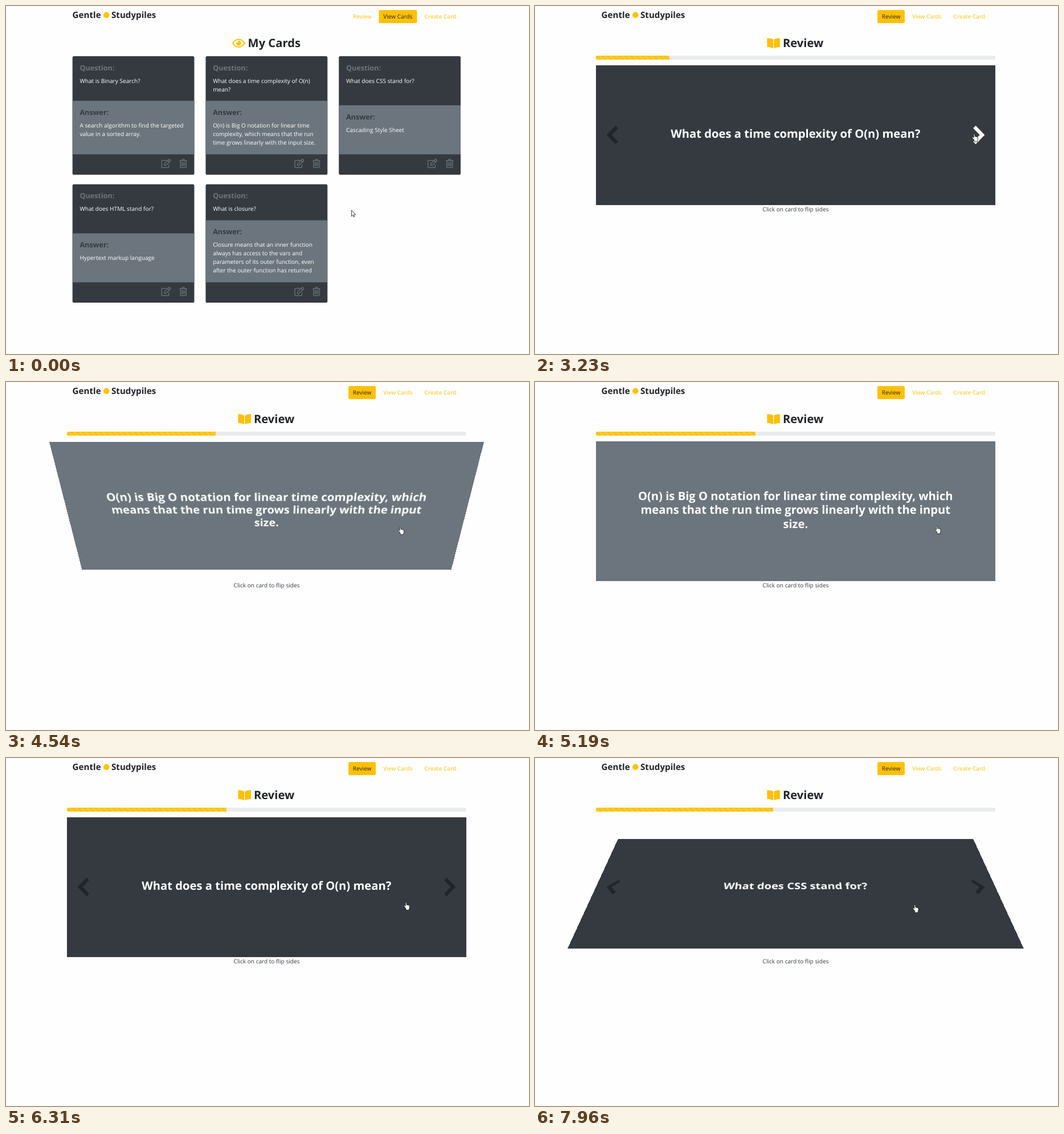
An HTML page for the animation above (8 s loop, 918 by 610 pixels).

```html
<!DOCTYPE html>
<html lang="en">
<head>
<meta charset="utf-8">
<title>Flash cards</title>
<style>
  html, body { margin: 0; width: 100%; height: 100%; overflow: hidden; background: #fefefe; }
  #stage { position: relative; width: 918px; height: 610px; overflow: hidden; }
  #stage > svg { position: absolute; left: 0; top: 0; }
  text { font-family: "Open Sans", sans-serif; font-size: 10.1px; white-space: pre; text-rendering: geometricPrecision; }
  .h1 { font-size: 20.2px; font-weight: 700; fill: #212529; }
  .h4 { font-size: 15.15px; font-weight: 700; fill: #212529; }
  .h5 { font-size: 12.63px; font-weight: 700; }
  .face { position: absolute; left: 107px; top: 104px; width: 701px; height: 245px;
    transform-origin: 50% 122px; backface-visibility: hidden; }
  .face svg { display: block; }
  .face text { font-size: 20.2px; font-weight: 700; fill: #fff; text-anchor: middle; }
  #front { background: #343a40; }
  #back { background: #6c757d; }
  #track { position: absolute; left: 107px; top: 87.4px; width: 701px; height: 6.4px;
    border-radius: 2.6px; background: #e9ecef; overflow: hidden; }
  #bar { height: 100%; background: #ffc107 linear-gradient(45deg,
    rgba(255,255,255,.15) 25%, transparent 25%, transparent 50%,
    rgba(255,255,255,.15) 50%, rgba(255,255,255,.15) 75%, transparent 75%) 0 0 / 10.1px 10.1px; }
</style>
</head>
<body>
<div id="stage">
  <svg width="918" height="610">
    <text class="h4" x="116.6" y="21.3">Gentle</text>
    <circle cx="176.3" cy="15.8" r="5.2" fill="#ffc107"/>
    <text class="h4" x="185" y="21.3">Studypiles</text>
    <g id="nav"></g>
    <g id="list">
      <path d="M398 65.2Q402 58.5 408.4 58.5T418.8 65.2Q414.8 71.9 408.4 71.9T398 65.2Z" fill="none" stroke="#ffc107" stroke-width="2"/>
      <path d="M408.4 60.8A4.4 4.4 0 1 1 404.2 64A2.2 2.2 0 0 0 407.2 61Z" fill="#ffc107"/>
      <text class="h1" x="424.6" y="72.2">My Cards</text>
      <g id="cards"></g>
    </g>
    <g id="review">
      <path id="leaf" fill="#ffc107" d="M418.1 74.2V59Q418 58.5 417.6 58.3C415 56.9 411.5 56.4 408.6 56.2Q407.4 56.2 407.4 57.4V70.8Q407.4 72 408.6 72.1C411.5 72.3 414.7 72.7 417.2 74Q418 74.5 418.1 74.2Z"/>
      <use href="#leaf" transform="translate(837.4 0) scale(-1 1)"/>
      <text class="h1" x="435" y="72.2">Review</text>
      <text x="457.5" y="360.4" text-anchor="middle" fill="#343a40">Click on card to flip sides</text>
    </g>
  </svg>
  <div id="panel">
    <div id="track"><div id="bar"></div></div>
    <div class="face" id="back">
      <svg width="701" height="245" viewBox="107 104 701 245">
        <text x="457.3" y="207.3">O(n) is Big O notation for linear time complexity, which</text>
        <text x="457.3" y="231.4">means that the run time grows linearly with the input</text>
        <text x="457.3" y="255.5">size.</text>
      </svg>
    </div>
    <div class="face" id="front">
      <svg width="701" height="245" viewBox="107 104 701 245">
        <text id="ask" x="457.3" y="231.4"></text>
        <g fill="none" stroke="#212529" stroke-width="6.2">
          <path d="M143.7 212L130 226L143.7 240"/>
          <path id="next" d="M771.3 212L785 226L771.3 240"/>
        </g>
      </svg>
    </div>
  </div>
  <svg width="918" height="610">
    <g id="cursor" fill="#fff" stroke="#111" stroke-width=".8" stroke-linejoin="round">
      <path id="arrow" d="M.4 0V10.8L2.7 8.5L4.3 11.9L5.9 11.1L4.3 7.8H7.6Z"/>
      <path id="hand" d="M-1 10.2L-3.8 7Q-4.2 5.6-2.8 5.6L-1.2 7V1.3Q-1.2.3-.2.3T.8 1.3V4.8Q2.1 4.2 2.7 5.2Q4 4.6 4.5 5.7Q6 5.4 6 6.9V9.7Q6 11.2 5.1 12.2V14H-.1V12.6Z"/>
    </g>
  </svg>
</div>
<script>
const $ = id => document.getElementById(id);
const LOOP = 8000, SWITCH = 1450, REM = 10.1;
const DARK = '#343a40', GRAY = '#6c757d';
const clamp = v => Math.min(1, Math.max(0, v));
const show = (el, on) => { el.style.display = on ? '' : 'none'; };

// CSS "ease" timing curve, solved by bisection
function ease(x) {
  x = clamp(x);
  const bez = (a, b, s) => 3 * a * s * (1 - s) ** 2 + 3 * b * s * s * (1 - s) + s ** 3;
  let lo = 0, hi = 1;
  for (let i = 0; i < 24; i++) {
    const mid = (lo + hi) / 2;
    if (bez(.25, .25, mid) < x) lo = mid; else hi = mid;
  }
  return bez(.1, 1, lo);
}

const mix = (a, b, k) => `rgb(${a.map((v, i) => Math.round(v + (b[i] - v) * k))})`;
const YELLOW = [255, 193, 7], INK = [33, 37, 41], PAPER = [255, 255, 255];

// Navigation
const buttons = [
  ['Review', 601, 48],
  ['View Cards', 654.5, 67],
  ['Create Card', 726.8, 71]
].map(([label, x, w]) => {
  $('nav').insertAdjacentHTML('beforeend',
    `<g><rect x="${x}" y="7" width="${w}" height="23" rx="2.5" fill="#ffc107"/>
     <text x="${x + 7.7}" y="22.2">${label}</text></g>`);
  const [box, text] = $('nav').lastElementChild.children;
  return k => {
    box.setAttribute('fill-opacity', k);
    text.setAttribute('fill', mix(YELLOW, INK, k));
  };
});

// Card list: column, top, split, question lines, answer lines
const deck = [
  [0, 88, 166.2, ['What is Binary Search?'],
    ['A search algorithm to find the targeted', 'value in a sorted array.']],
  [1, 88, 166.2, ['What does a time complexity of O(n)', 'mean?'],
    ['O(n) is Big O notation for linear time', 'complexity, which means that the run', 'time grows linearly with the input size.']],
  [2, 88, 174, ['What does CSS stand for?'], ['Cascading Style Sheet']],
  [0, 312.4, 398.5, ['What does HTML stand for?'], ['Hypertext markup language']],
  [1, 312.4, 375.6, ['What is closure?'],
    ['Closure means that an inner function', 'always has access to the vars and',
     'parameters of its outer function, even', 'after the outer function has returned']]
];

function section(x, y, title, color, lines) {
  const rows = lines.map((s, i) =>
    `<text x="${x}" y="${y + 46.5 + i * 15.13}" fill="#fff">${s}</text>`);
  return `<text class="h5" x="${x}" y="${y + 24.7}" fill="${color}">${title}</text>` + rows.join('');
}

$('cards').innerHTML = deck.map(([col, top, split, question, answer]) => {
  const x = 116.7 + 233.75 * col, foot = top + 172;
  return `<rect x="${x}" y="${top}" width="213.8" height="207.7" rx="2.5" fill="${DARK}"/>
    <rect x="${x}" y="${split}" width="213.8" height="${foot - split}" fill="${GRAY}"/>
    ${section(x + 12.7, top, 'Question:', GRAY, question)}
    ${section(x + 12.7, split, 'Answer:', DARK, answer)}
    <g fill="none" stroke="${GRAY}" stroke-width="1.3">
      <path transform="translate(${x + 155.5} ${foot + 8})"
        d="M10 2.7H2.2Q1 2.7 1 3.9V14.1Q1 15.3 2.2 15.3H12.4Q13.6 15.3 13.6 14.1V10M6 8.5L13.5 1Q14.3.4 15.1 1L16.3 2.2Q17 3 16.3 3.8L8.8 11.2L5.7 11.6ZM11.9 2.7L14.6 5.4"/>
      <path transform="translate(${x + 187.8} ${foot + 8})"
        d="M0 3.2H13.4M3.9 3.2L5 .9H8.4L9.5 3.2M1.6 3.2V14.2Q1.6 15.2 2.6 15.2H10.8Q11.8 15.2 11.8 14.2V3.2M4.3 5.8V12.8M6.7 5.8V12.8M9.1 5.8V12.8"/>
    </g>`;
}).join('');

// Review: which question shows from when, flips, seen-card progress
const asks = [[0, 'What is Binary Search?'],
  [2840, 'What does a time complexity of O(n) mean?'],
  [7050, 'What does CSS stand for?']];
const flips = [4200, 5730, 7861];
const seen = [2840, 4200, 7861];
const total = (starts, t) => starts.reduce((sum, s) => sum + ease((t - s) / 600), 0);

// Pointer track: time, x, y
const track = [
  [0, 606, 358], [49, 606, 358], [50, 605, 353], [400, 605, 353], [600, 630, 230],
  [760, 664, 60], [880, 626, 20], [980, 621, 9], [1160, 621, 9], [1260, 625, 17],
  [1860, 625, 17], [2250, 705, 110], [2670, 772, 224], [3420, 771, 224], [3610, 730, 227],
  [4050, 687, 254], [4400, 687, 254], [4900, 706, 252], [5600, 706, 252], [5740, 701, 253],
  [6300, 701, 253], [6850, 766, 234], [7380, 766, 234], [7700, 667, 257], [LOOP, 667, 257]
];

function pointer(t) {
  const i = Math.max(1, track.findIndex(k => k[0] > t));
  const [t0, x0, y0] = track[i - 1], [t1, x1, y1] = track[i];
  const k = (t - t0) / (t1 - t0);
  return [x0 + (x1 - x0) * k, y0 + (y1 - y0) * k];
}

function draw(t) {
  const inReview = t >= SWITCH;
  show($('list'), !inReview);
  show($('review'), inReview);
  show($('panel'), inReview);

  buttons[0](ease((t - 870) / 150));
  buttons[1](1 - ease((t - 1480) / 150));
  buttons[2](0);

  const [x, y] = pointer(t);
  const angle = 180 * total(flips, t);
  const flat = Math.abs(Math.cos(angle * Math.PI / 180)) > .5;
  const onNav = x > 601 && x < 649 && y > 7 && y < 30;
  const onCard = inReview && x > 107 && x < 808 && y > 104 && y < 349 && flat;
  $('cursor').setAttribute('transform', `translate(${x} ${y})`);
  show($('hand'), onNav || onCard);
  show($('arrow'), !(onNav || onCard));

  if (!inReview) return;
  const turn = a => `perspective(631px) rotateX(${a}deg)`;
  $('front').style.transform = turn(angle);
  $('back').style.transform = turn(angle - 180);
  $('ask').textContent = asks.filter(a => a[0] <= t).pop()[1];
  const hover = onCard ? clamp((x - 740) / 18) : 0;
  $('next').setAttribute('stroke', mix(INK, PAPER, hover));
  $('bar').style.width = 20 * total(seen, t) + '%';
  $('bar').style.backgroundPositionX = REM * (.5 - t % 1000 / 1000) + 'px';
}

const start = performance.now();
function tick() {
  draw((performance.now() - start) % LOOP);
  requestAnimationFrame(tick);
}
tick();
</script>
</body>
</html>
```
